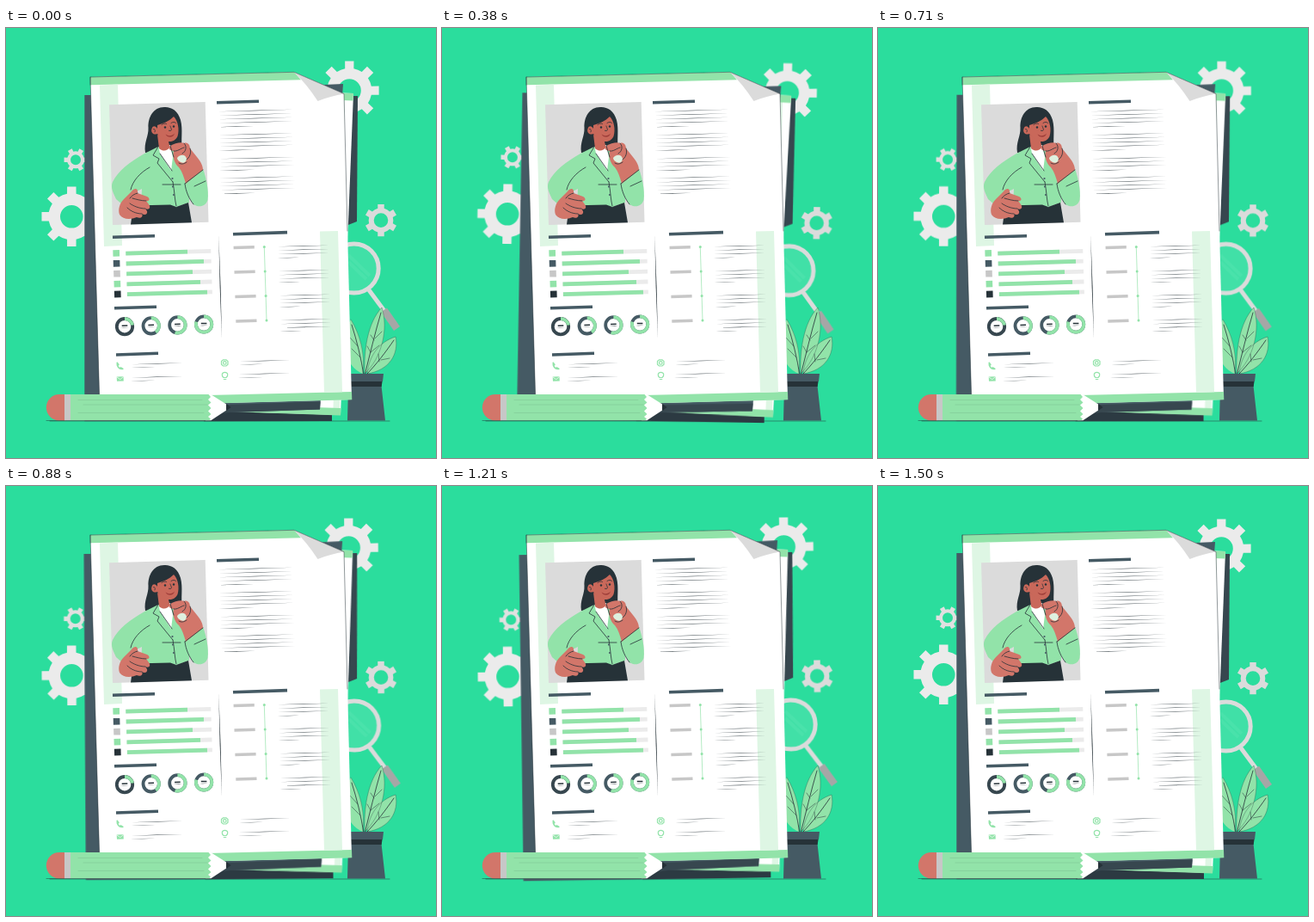
An HTML page for the animation above (1540 ms loop, 500 by 500 pixels).

```html
<!DOCTYPE html>
<html lang="en">
<head>
<meta charset="utf-8">
<title>Curriculum vitae</title>
<style>
  html, body { margin: 0; width: 100%; height: 100%; overflow: hidden; background: #2bdd9d; }
  svg { display: block; width: 100vw; height: 100vh; }
  #sway { transform-origin: 250px 205px; animation: sway 1.54s linear infinite; }
  /* 1.5 s swing, then a short rest before the loop */
  @keyframes sway {
    0%, 97.4%, 100% { transform: rotate(0deg); }
    24.35% { transform: rotate(1deg); }
    73.05% { transform: rotate(-1deg); }
  }
  .mint { fill: #92e3a9; }
  .slate { fill: #455a64; }
  .dusk { fill: #37474f; }
  .ink { fill: #263238; }
  .face { fill: #c9685a; }
  .skin { fill: #d2766a; }
  .pale { fill: #def6e4; }
  .hair { fill: none; stroke: #263238; stroke-width: .5; stroke-linecap: round; }
  .pen { fill: none; stroke: #263238; stroke-width: .8; stroke-linecap: round; stroke-linejoin: round; }
  .head { stroke: #455a64; stroke-width: 3.6; }
  .tag { stroke: #c7c7c7; stroke-width: 3.5; }
  .icon { fill: none; stroke: #92e3a9; stroke-width: 1.2; stroke-linecap: round; }
</style>
</head>
<body>
<svg viewBox="0 0 500 500">
  <path class="hair" d="M51 457H446"/>

  <g id="sway">
    <g id="gears"></g>
    <g id="lens">
      <circle cx="404.7" cy="279.5" r="28.5" fill="#fff" fill-opacity=".1"/>
      <path d="M398 264L423 288M398 272L419 292" stroke="#fff" stroke-opacity=".05" stroke-width="4"/>
      <circle cx="404.7" cy="279.5" r="28.5" fill="none" stroke="#dbdbdb" stroke-width="5"/>
      <path d="M421.5 304L440 329" stroke="#dbdbdb" stroke-width="5"/>
      <path d="M439.5 328L454.5 349.5" stroke="#a6a6a6" stroke-width="8.5"/>
    </g>
    <path class="dusk" d="M380 79L409 79L408 225L380 236Z"/>
    <path class="slate" d="M91.3 78L380 78L379 457L91.3 457.3Z"/>
    <path fill="#2c3a42" d="M230 445L379 449L379 457L230 457.2Z"/>
    <path fill="#fff" d="M200 68L404 76L389 450L200 444Z"/>
    <path class="pale" d="M388 84L394 84L388 442L380.5 442Z"/>
    <path class="mint" d="M370 74.8L404 76L403.6 84.5L370 83.3ZM200 436L389.3 442L389 450.5L200 444Z"/>
    <path class="slate" d="M200 73.5L392 65L365 443.5L200 449Z"/>
    <path class="dusk" d="M200 440L365.5 434.5L365 443.5L200 449Z"/>
  </g>

  <g id="plant">
    <path class="mint" d="M415 402C394 394 386 362 401 339C411 355 418 378 415 402Z"/>
    <path class="mint" d="M417 402C416 376 420 343 437 325C445 350 437 384 417 402Z"/>
    <path class="mint" d="M420 402C422 381 434 365 453 359C457 379 446 398 420 402Z"/>
    <path class="hair" d="M401 339C411 355 418 378 415 402M417 402C416 376 420 343 437 325C445 350 437 384 417 402M420 402C422 381 434 365 453 359C457 379 446 398 420 402" opacity=".6"/>
    <path class="pen" d="M416 404C413 384 408 364 402 345M417 404C423 380 429 355 436 331M418 404C431 391 442 376 451 363"/>
    <path class="hair" d="M412 383L402 373M409 370L400 360M424 377L420 370M424 377L434 369M428 363L424 357M429 361L437 353M434 388L433 379M436 386L446 384"/>
    <path class="slate" d="M396.5 402H439L438 411H397ZM398 416H436.5L441 456.5H397Z"/>
    <path class="ink" d="M397 411H437.5L436.7 417H397.5Z"/>
  </g>

  <g id="page">
    <path fill="#fff" d="M98 57L335 51.3L393 76.5L402 432L109 440Z"/>
    <path class="mint" d="M98 57L335 51.3L343 60.3L98.3 66.3ZM108.3 430L402 423L402.3 432.3L109 440Z"/>
    <path class="pale" d="M109 66.4L130 65.8L135 253L114 254ZM365 236.5L386 236L391 423.3L370 424Z"/>
    <path fill="#dbdbdb" d="M335 51.3L393 76.5C383 78.5 372 81 362.5 85C354 72 345 61 335 51.3Z"/>
    <path class="hair" d="M98 66V57L335 51.3L393 76.5L397 236M98 57L108.5 426"/>
    <path fill="#dbdbdb" d="M120 89.3L231.7 86L235.5 225.7L124 229Z"/>
  </g>

  <g id="woman">
    <path class="ink" d="M184 92C171 92 165 104 165.5 116C166 126 160 133 162 145L205 142C203 130 206 118 203 107C200 96 192 91.5 184 92Z"/>
    <path class="mint" d="M177 138L161 146C145 155 130 166 124 179C121 186 125 192 128 199L135 205L150 191L158 187L157 206L189 206L198 208L213 203L209 181C207 166 203 148 196 141Z"/>
    <path class="ink" d="M148 206.5L191 205.5L198 208L212 203L216 226.3L145 228.4Z"/>
    <path class="mint" d="M183 204L192 200L198 208.5L204 199L213 203V181L160 181L158 206Z"/>
    <path fill="#fff" d="M177.5 138L191 136L194 150L192 166L179 146Z"/>
    <path class="face" d="M176 124L189 132L190.5 139C187 143 183 144 178 140Z"/>
    <path class="face" d="M176 113C183 111 190 108 195 103C200 108 202 118 199.5 126C196 133 189 133.5 183 130C180 128 177 125 176 123C171 125 168 121 169.5 117C171 113 174 114 176 117Z"/>
    <path class="pen" d="M181 112.5C183 110.7 185 110.7 186.5 111.5M192 110.5C194 109 196 109 197.5 110.5M191 114C191.5 116 193.5 118.5 191.5 119.5L189.5 119.3M171.5 117.5C173 117 174 119 173 121"/>
    <path d="M185.5 123.5C189 126 193 126 196 122.5C195 127.5 188 128.5 185.5 123.5Z" fill="#9d3d39"/>
    <circle class="ink" cx="185" cy="115.5" r="1.2"/><circle class="ink" cx="195" cy="114.5" r="1.2"/>
    <!-- arm raised to the chin -->
    <path class="mint" d="M208 181L229 164C233 174 236 190 234.5 200C232 208 224 209 218 205C213 198 209 190 208 181Z"/>
    <path class="skin" d="M191 137C196 134 204 132 207 134C212 132 214 137 214 140L222 150C227 156 229 161 229 165L209 181C207 174 205 167 201 162C196 158 193 149 195 143C190 143 188 139 191 137Z"/>
    <path fill="#def0df" d="M199 151C203 146 209 147 210 152C210 156 206 158 203 156C201 155 199 153 199 151Z"/>
    <path class="pen" d="M195 143C199 144 203 140 207 139M207 134C211 138 209 144 205 146M214 140C216 146 213 151 210 153M201 157C204 159 207 158 210 156M208 181L229 165M208 181C209 190 213 199 218 205"/>
    <!-- hand on hip -->
    <path class="skin" d="M146 190C150 185 154 187 153 192L164 196C168 198 167 202 163 201L166 205C169 209 166 212 162 210L164 213C165 217 161 218 158 216C160 220 156 222 152 220C145 223 136 223 132 217C130 211 132 204 137 199Z"/>
    <path class="pen" d="M153 192C149 193 146 195 144 198M163 201C157 201 151 199 147 198M162 210C155 210 148 207 144 204M158 216C151 216 145 213 141 209"/>
    <path class="pen" d="M177 138L171 148L178 152L176 157L194 179M191 137L195 150M179 146L193 166M145 188C147 178 156 168 167 162M182 182H203M194 179C196 190 196 199 198 207M219 184L232 178"/>
    <g class="slate"><circle cx="193.5" cy="175" r="1.1"/><circle cx="194" cy="184.5" r="1.1"/><circle cx="195" cy="194" r="1.1"/></g>
  </g>

  <g id="details">
    <path class="icon" style="stroke-width:1.8" d="M129.5 389.5C128.5 393 131.5 397 135.5 396.3M129.3 389.5L130.8 391.5M133.3 395L135.7 396.3"/>
    <path class="mint" d="M128.7 405.6L136.5 405.2L136.8 410.4L129 410.8Z"/>
    <path d="M129 406L132.8 408.6L136.4 405.6" fill="none" stroke="#fff" stroke-width=".7"/>
    <path class="icon" d="M250.5 387.5L252.5 385.8H256L258 387.5V391.3L256 393H252.5L250.5 391.3Z"/>
    <circle class="icon" cx="254.3" cy="389.4" r="1.8"/>
    <path class="icon" d="M253 406.5C250 404 251 400.3 254.5 400.3C258 400.3 259 404 256 406.5ZM253.3 408.5H255.8"/>
  </g>

  <g id="pencil">
    <path fill="#d2766a" d="M69 426H62A15.2 15.2 0 0 0 62 456.4H69Z"/>
    <path fill="#c7c7c7" d="M68 426H75V456.4H68Z"/>
    <path fill="#fff" d="M232 426H238L257 438V444L238 456.4H232Z"/>
    <path class="ink" d="M256 436.7L261.5 441L256 445.2Z"/>
    <path class="mint" d="M75 426H235.5L238 429L235 432L238.5 435.5L235 438.5L238.5 442L235 445.5L238.5 449L235 452L238 454.5L236 456.4H75Z"/>
    <path class="hair" d="M84 432.5H228M90 438H234M84 447.5H230" opacity=".2"/>
    <path class="hair" d="M47 456.6H238"/>
  </g>
</svg>
<script>
  const NS = 'http://www.w3.org/2000/svg';
  const add = (id, tag, attrs) => {
    const el = document.createElementNS(NS, tag);
    for (const k in attrs) el.setAttribute(k, attrs[k]);
    document.getElementById(id).appendChild(el);
  };
  const line = (cls, x1, y1, x2, y2, extra) =>
    add('details', 'path', { class: cls, d: `M${x1} ${y1}L${x2} ${y2}`, ...extra });

  // a stroke that tapers to both ends
  function sliver(x1, y1, x2, y2, w = .45) {
    const mx = (x1 + x2) / 2, my = (y1 + y2) / 2, len = Math.hypot(x2 - x1, y2 - y1);
    const nx = (y1 - y2) / len * w, ny = (x2 - x1) / len * w;
    add('details', 'path', {
      class: 'ink',
      d: `M${x1} ${y1}Q${mx + nx} ${my + ny} ${x2} ${y2}Q${mx - nx} ${my - ny} ${x1} ${y1}Z`
    });
  }

  function gear(cx, cy, teeth, outer, root, hole, fill, turn = 0) {
    const pt = (r, a) => `${(cx + r * Math.sin(a)).toFixed(2)} ${(cy - r * Math.cos(a)).toFixed(2)}`;
    const step = 2 * Math.PI / teeth;
    let d = '';
    for (let i = 0; i < teeth; i++) {
      const a = (i + turn) * step;
      d += (i ? 'L' : 'M') + pt(root, a - step * .25) + 'L' + pt(outer, a - step * .19) +
        'L' + pt(outer, a + step * .19) + 'L' + pt(root, a + step * .25) +
        `A${root} ${root} 0 0 1 ${pt(root, a + step * .75)}`;
    }
    d += `ZM${cx - hole} ${cy}a${hole} ${hole} 0 1 0 ${2 * hole} 0a${hole} ${hole} 0 1 0 ${-2 * hole} 0Z`;
    add('gears', 'path', { d, fill, 'fill-rule': 'evenodd' });
  }
  gear(399.3, 72.7, 8, 34.7, 26, 13.5, '#ebebeb');
  gear(76.3, 219.3, 8, 35.2, 27, 13.3, '#ebebeb');
  gear(81, 153.3, 6, 13.7, 10, 6, '#e0e0e0', .5);
  gear(436, 223.6, 6, 19, 14.3, 8.3, '#dbdbdb');

  // rows of thin rules; the last one is short
  function paragraph(x, y, rows, width, short, gap) {
    for (let i = 0; i < rows; i++) {
      const w = i < rows - 1 ? width : short, sx = x + i * .12, sy = y + i * gap;
      sliver(sx, sy, sx + w, sy - w * .027);
    }
  }
  paragraph(246, 97.2, 5, 88, 42, 4.5);
  paragraph(246.7, 124.6, 5, 88, 42, 4.5);
  paragraph(247.4, 152.3, 4, 88, 42, 4.5);
  paragraph(248, 175, 5, 88, 42, 4.5);
  for (let i = 0; i < 4; i++) {
    const x = 300.3 + i * .9, y = 254.5 + i * 28.5;
    paragraph(x + 15.3, y - .2, 4, 60, 25, 4.4);
    line('tag', x - 35.7, y + 1.1, x - 11.5, y + .3);
    add('details', 'circle', { cx: x, cy: y, r: 1.5, class: 'mint' });
  }
  line('icon', 300.3, 254.5, 303, 340, { style: 'stroke-width:.7' });
  paragraph(146, 391.2, 2, 60, 27, 3.7);
  paragraph(145, 406.7, 2, 61, 28, 3.7);
  paragraph(271.5, 387.8, 2, 59, 27, 3.7);
  paragraph(270, 403, 2, 61, 28, 3.7);
  sliver(247.3, 241, 251, 362, .9);

  [[245, 86.7, 294, 85.3], [124, 243.2, 173, 241.7], [264, 239.7, 327, 237.6],
   [126, 325.7, 175, 324.2], [128, 380, 177, 378.3]].forEach(p => line('head', ...p));

  ['#92e3a9', '#455a64', '#c7c7c7', '#92e3a9', '#263238'].forEach((fill, i) => {
    const x = 124.3 + i * .4, y = 258.2 + i * 11.9, x0 = x + 15, y0 = y + 3.9;
    const end = [211, 230, 217, 226, 234][i];
    add('details', 'rect', { x, y, width: 7.6, height: 7.6, fill, transform: `rotate(-1.6 ${x} ${y})` });
    line('', x0, y0, x0 + 99, y0 - 2.8, { stroke: '#ebebeb', 'stroke-width': 4.8 });
    line('', x0, y0, end, y0 - (end - x0) * .0283, { stroke: '#92e3a9', 'stroke-width': 4.8 });
  });

  [.22, .4, .55, .8].forEach((part, i) => {
    const cx = 138 + i * 30.7, cy = 347.2 - i * .9;
    const ring = { cx, cy, r: 9.2, fill: 'none', 'stroke-width': 3.8, transform: `rotate(-90 ${cx} ${cy})` };
    add('details', 'circle', { ...ring, stroke: i ? '#455a64' : '#37474f' });
    add('details', 'circle', { ...ring, stroke: '#92e3a9', pathLength: 1, 'stroke-dasharray': `${part} 1` });
    line('', cx - 3.3, cy - .9, cx + 3.3, cy - 1.1, { stroke: '#263238', 'stroke-width': 1.5 });
    sliver(cx - 4.8, cy + 1.6, cx + 4.8, cy + 1.3);
  });
</script>
</body>
</html>
```
